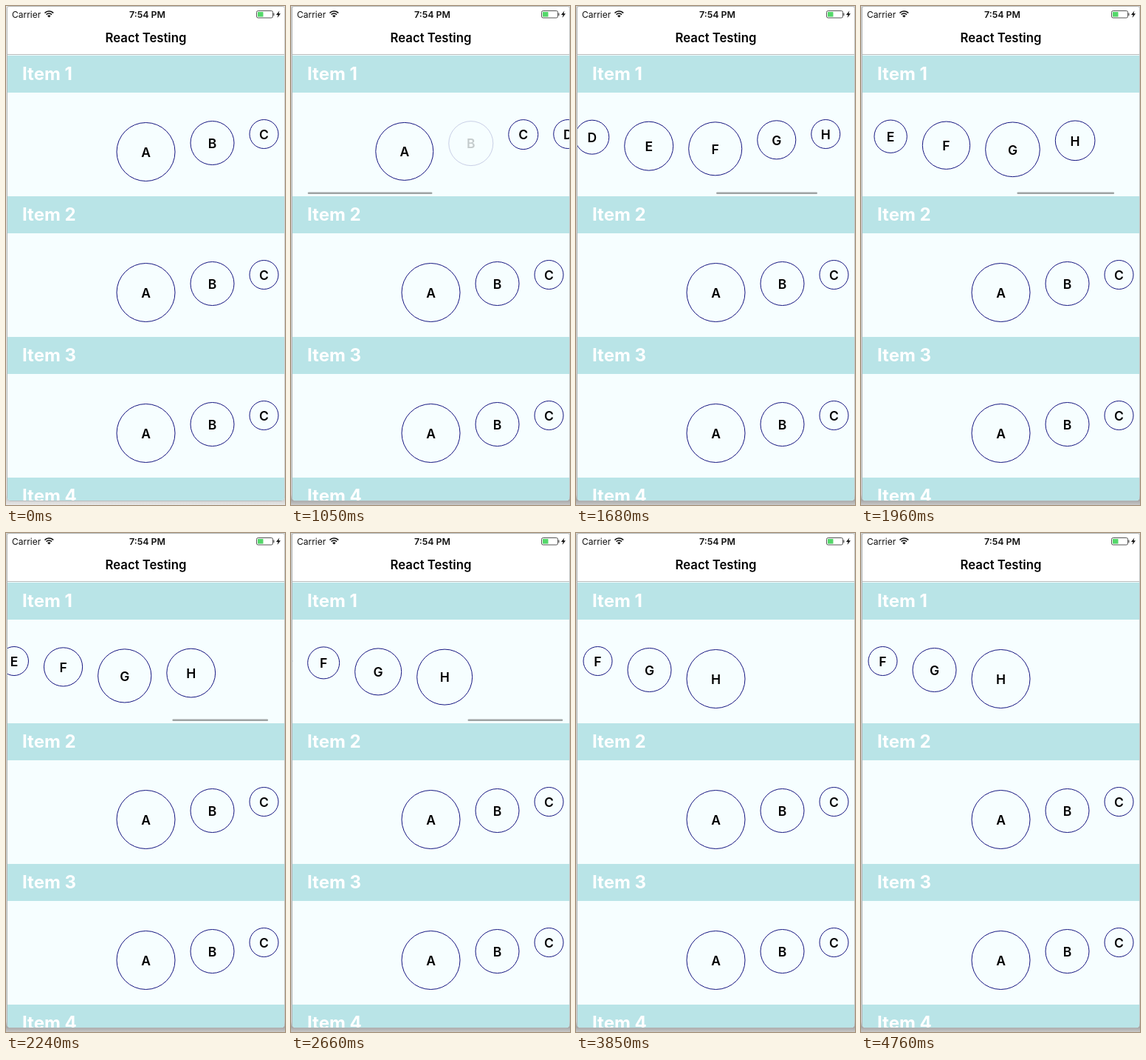
These frames come from a looping animation (378 px wide and 674 px high, 4830 ms). An HTML page with a canvas:

```html
<!DOCTYPE html>
<html lang="en">
<head>
<meta charset="utf-8">
<title>Carousel list</title>
<style>
html, body { margin: 0; width: 100%; height: 100%; overflow: hidden; background: #fff; }
canvas { display: block; width: 378px; height: 674px; }
</style>
</head>
<body>
<canvas id="stage"></canvas>
<script>
const W = 378, H = 674, LOOP = 4830, STEP = 70;
const COUNT = 8, GAP = 20, PAGE = 100;
const VIEW = 375, LEFT = 2, SIDE = 147.5, SHIFT = 260 / 7;
const FONT = 'Inter, Roboto, "Liberation Sans", sans-serif';

const canvas = document.getElementById('stage');
const ctx = canvas.getContext('2d');
const scale = window.devicePixelRatio || 1;
canvas.width = W * scale;
canvas.height = H * scale;

const clamp = (v, lo = 0, hi = 1) => Math.min(hi, Math.max(lo, v));
const ramp = (t, from, to) => clamp((t - from) / (to - from));

// Finger flick, then a decaying glide to the last page.
function scrollAt(t) {
  if (t < 1120) return 118 * Math.pow(ramp(t, 980, 1120), 1.67);
  const s = (t - 1680) / 1000;
  return 700 - Math.exp(5.278 - 1.9 * s - 0.46 * Math.pow(s, 5));
}

// The layout trails the scroll offset while it moves fast.
function pageAt(t) {
  const lag = clamp(49 + (t - 1050) * 0.1, 49, 95) * (1 - ramp(t, 1750, 2200));
  const page = scrollAt(t - lag) / PAGE;
  return t < 3430 ? Math.min(page, 6.98) : page;
}

const sizeAt = (i, page) => 80 - 20 * Math.min(2, Math.abs(i - page));

function text(str, x, y, size, weight, color, align = 'left') {
  ctx.font = `${weight} ${size}px ${FONT}`;
  ctx.textAlign = align;
  ctx.fillStyle = color;
  ctx.fillText(str, x, y);
}

function rect(x, y, w, h, color) {
  ctx.fillStyle = color;
  ctx.fillRect(x, y, w, h);
}

function pill(x, y, w, h, r) {
  ctx.beginPath();
  ctx.roundRect(x, y, w, h, r);
}

function bubble(label, x, y, r) {
  ctx.beginPath();
  ctx.arc(x, y, r - 0.5, 0, Math.PI * 2);
  ctx.strokeStyle = '#151580';
  ctx.lineWidth = 1;
  ctx.stroke();
  text(label, x, y + 6.8, 17.5, 600, '#000', 'center');
}

function carousel(top, scroll, page, pressed) {
  let x = LEFT + SIDE + SHIFT * page - scroll;
  for (let i = 0; i < COUNT; i++) {
    const size = sizeAt(i, page), r = size / 2;
    if (x < W && x + size > 0) {
      ctx.globalAlpha = i === 1 ? 1 - 0.8 * pressed : 1;
      bubble(String.fromCharCode(65 + i), x + r, top + 130 - 1.2 * (40 - r), r);
    }
    x += size + GAP;
  }
  ctx.globalAlpha = 1;
}

function indicator(scroll, page, alpha) {
  let content = 2 * SIDE + SHIFT * page + GAP * (COUNT - 1);
  for (let i = 0; i < COUNT; i++) content += sizeAt(i, page);
  const track = 368;
  pill(6 + scroll / content * track, 251.5, VIEW / content * track, 2.5, 1.25);
  ctx.fillStyle = `rgba(0,0,0,${0.36 * alpha})`;
  ctx.fill();
}

function statusBar() {
  text('Carrier', 8, 16, 12, 400, '#111');
  text('7:54 PM', 191.5, 16, 12.4, 600, '#111', 'center');

  ctx.strokeStyle = '#111';
  ctx.lineWidth = 1.7;
  for (const r of [8, 5]) {
    ctx.beginPath();
    ctx.arc(58.3, 15, r, -Math.PI * 0.76, -Math.PI * 0.24);
    ctx.stroke();
  }
  ctx.beginPath();
  ctx.moveTo(58.3, 15.5);
  ctx.arc(58.3, 15.5, 3, -Math.PI * 0.76, -Math.PI * 0.24);
  ctx.fillStyle = '#111';
  ctx.fill();

  pill(339.5, 6.5, 22, 9.5, 2);
  ctx.strokeStyle = '#555';
  ctx.lineWidth = 1;
  ctx.stroke();
  rect(341, 8, 7.5, 6.5, '#53d769');
  rect(362.3, 9.5, 1.2, 3.5, '#555');

  ctx.beginPath();
  [[370.4, 6.5], [366, 12], [368.6, 12], [367.6, 16], [372, 10.3], [369.4, 10.3]]
    .forEach(([x, y]) => ctx.lineTo(x, y));
  ctx.fillStyle = '#111';
  ctx.fill();
}

function backdrop(active) {
  rect(0, 0, W, H, active ? '#d2d2d2' : '#e6e6e6');
  const shade = ctx.createLinearGradient(0, 660, 0, H);
  const stops = active ? ['#d2d2d2', '#a4a4a4', '#c8c8c8'] : ['#e6e6e6', '#cfcfcf', '#e8e8e8'];
  stops.forEach((color, i) => shade.addColorStop(i / 2, color));
  rect(0, 660, W, 14, shade);
  pill(1, 0, 376.5, 668.8, [4, 4, 5, 5]);
  ctx.fillStyle = '#b4b8b8';
  ctx.fill();
}

function draw(t) {
  const scroll = scrollAt(t), page = pageAt(t);
  const pressed = ramp(t, 770, 910) * (1 - ramp(t, 1050, 1260));
  const bar = t < 1050 ? 0 : 1 - ramp(t, 3290, 3570);

  ctx.setTransform(scale, 0, 0, scale, 0, 0);
  backdrop(t >= 840);

  ctx.save();
  pill(2, 1, 375, 667, [3, 3, 4, 4]);
  ctx.clip();
  rect(0, 0, W, H, '#f6feff');
  rect(0, 0, W, 66, '#fff');
  rect(0, 65, W, 1, '#b8bcbc');
  for (let i = 0; i < 4; i++) {
    const top = 67 + i * 190;
    rect(0, top, W, 50, '#b9e4e7');
    text('Item ' + (i + 1), 22, top + 33, 24, 700, '#fff');
    if (i < 3) carousel(top, i ? 0 : scroll, i ? 0 : page, i ? 0 : pressed);
  }
  if (bar > 0) indicator(scroll, page, bar);
  statusBar();
  text('React Testing', 189.5, 49, 16.7, 600, '#000', 'center');
  ctx.restore();
}

const start = performance.now();
function tick() {
  const t = (performance.now() - start) % LOOP;
  draw(Math.floor(t / STEP) * STEP);
  requestAnimationFrame(tick);
}
tick();
</script>
</body>
</html>
```
